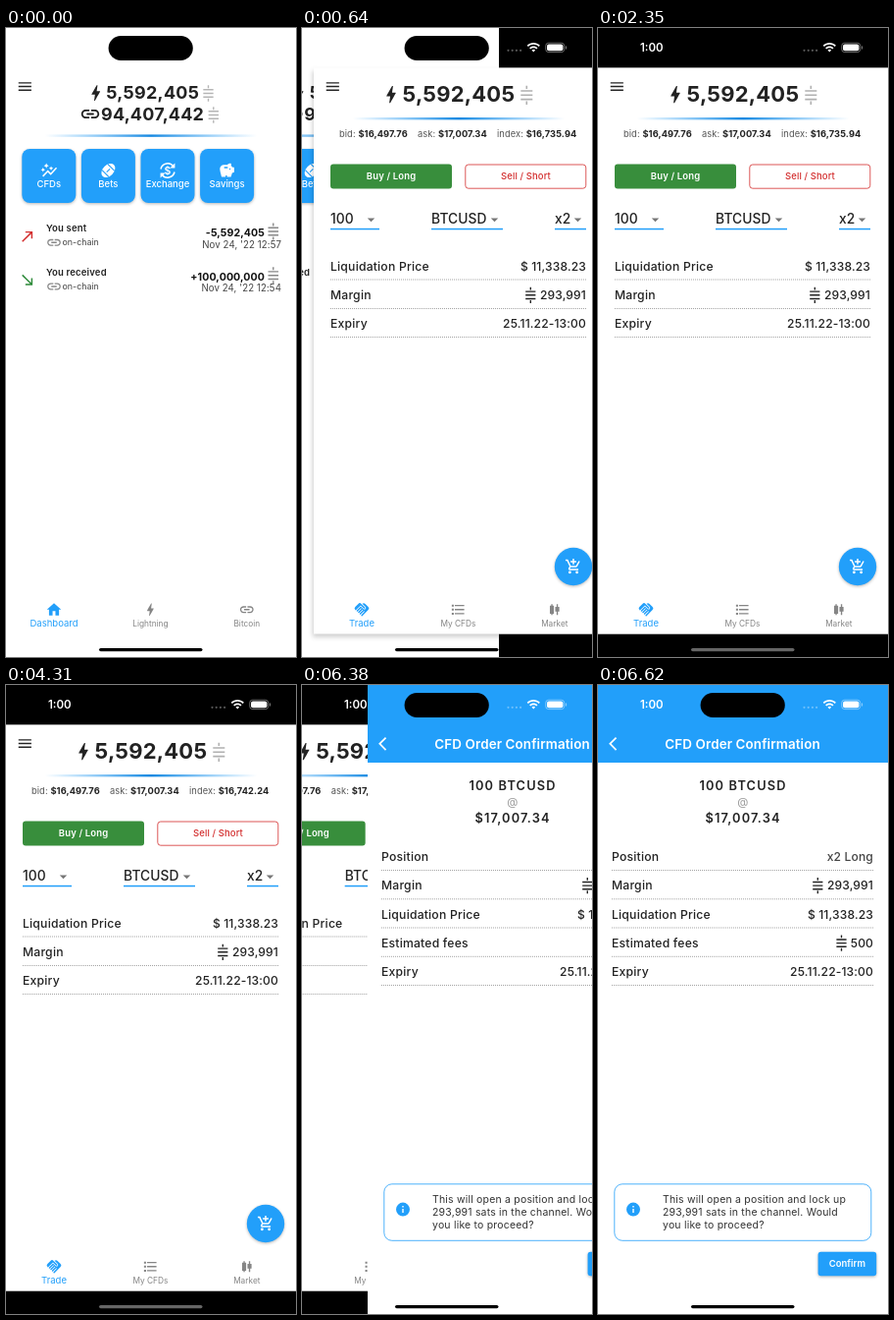
An HTML page for the animation above (8000 ms loop, 296 by 640 pixels).

```html
<!DOCTYPE html>
<html lang="en">
<head>
<meta charset="utf-8">
<title>Trading wallet</title>
<style>
  html, body { margin: 0; width: 100%; height: 100%; overflow: hidden; background: #fff; }
  svg { display: block; width: 100%; height: 100%; }
  text { font-family: Inter, Roboto, sans-serif; white-space: pre; }
  .lift { filter: drop-shadow(0 1.5px 1.5px rgba(0, 0, 0, .28)); }
  .sheet { filter: drop-shadow(-.5px 3px 2.5px rgba(0, 0, 0, .2)); }
</style>
</head>
<body>
<svg id="stage" viewBox="0 0 296 640" xmlns="http://www.w3.org/2000/svg"></svg>
<script>
const LOOP = 8000, WIDTH = 296, TOP = 40.6, BOTTOM = 616.5;
const BLUE = '#229ffa', INK = '#222', GREY = '#858585', RED = '#d32f2f', GREEN = '#388e3c';

// Icon outlines on a 24 unit grid
const ICONS = {
  menu: 'M3 18h18v-2H3zm0-5h18v-2H3zm0-7v2h18V6z',
  bolt: 'M11 21h-1l1-7H7.5c-.58 0-.57-.32-.38-.66C8.48 10.94 10.42 7.54 13 3h1l-1 7h3.5c.49 0 .56.33.47.51C12.96 17.55 11 21 11 21z',
  link: 'M3.9 12c0-1.71 1.39-3.1 3.1-3.1h4V7H7c-2.76 0-5 2.24-5 5s2.24 5 5 5h4v-1.9H7c-1.71 0-3.1-1.39-3.1-3.1zM8 13h8v-2H8zm9-6h-4v1.9h4c1.71 0 3.1 1.39 3.1 3.1s-1.39 3.1-3.1 3.1h-4V17h4c2.76 0 5-2.24 5-5s-2.24-5-5-5z',
  graph: 'M14.06 9.94L12 9l2.06-.94L15 6l.94 2.06L18 9l-2.06.94L15 12zM4 14l.94-2.06L7 11l-2.06-.94L4 8l-.94 2.06L1 11l2.06.94zm4.5-5l1.09-2.41L12 5.5 9.59 4.41 8.5 2 7.41 4.41 5 5.5l2.41 1.09zm-4 11.5l6-6.01 4 4L23 8.93l-1.41-1.41-7.09 7.97-4-4L3 19z',
  pig: 'M19.83 7.5l-2.27-2.27c.07-.42.18-.81.32-1.15.08-.18.12-.37.12-.58 0-.83-.67-1.5-1.5-1.5-1.64 0-3.09.79-4 2h-5C4.46 4 2 6.46 2 9.5S4.5 21 4.5 21H10v-2h2v2h5.5l1.68-5.59 2.82-.94V7.5zM13 9H8V7h5zm3 2a1 1 0 1 1 0-2 1 1 0 0 1 0 2z',
  up: 'M9 5v2h6.59L4 18.59 5.41 20 17 8.41V15h2V5z',
  down: 'M9 19v-2h6.59L4 5.41 5.41 4 17 15.59V9h2v10z',
  home: 'M10 20v-6h4v6h5v-8h3L12 3 2 12h3v8z',
  shake: 'M16.48 10.41c-.39.39-1.04.39-1.43 0l-4.47-4.46-7.05 7.04-.66-.63a3 3 0 0 1 0-4.24l4.24-4.24a3 3 0 0 1 4.24 0l5.13 5.13c.4.39.4 1.02 0 1.4zm.7-2.12c.78.78.78 2.05 0 2.83-1.27 1.27-2.61.22-2.83 0l-3.76-3.76-5.57 5.57a1 1 0 0 0 0 1.42c.39.39 1.02.39 1.42 0l4.62-4.62.71.71-4.62 4.62a1 1 0 0 0 0 1.42c.39.39 1.02.39 1.42 0l4.62-4.62.71.71-4.62 4.62a1 1 0 0 0 0 1.42c.39.39 1.02.39 1.42 0l4.62-4.62.71.71-4.62 4.62a1 1 0 0 0 1.41 1.41l8.32-8.34a3 3 0 0 0 0-4.24l-4.24-4.24a3 3 0 0 0-4.18-.06z',
  list: 'M7 5h14v2H7zm0 6h14v2H7zm0 6h14v2H7zM2.5 4.5h3v3h-3zm0 6h3v3h-3zm0 6h3v3h-3z',
  candles: 'M9 4H7v2H5v12h2v2h2v-2h2V6H9zm10 4h-2V4h-2v4h-2v7h2v5h2v-5h2z',
  drop: 'M7 10l5 5 5-5z',
  cart: 'M11 9h2V6h3V4h-3V1h-2v3H8v2h3zm-4 9a2 2 0 1 0 0 4 2 2 0 0 0 0-4zm10 0a2 2 0 1 0 0 4 2 2 0 0 0 0-4zm-9.83-3.25l.93-1.75h7.45c.75 0 1.41-.41 1.75-1.03l3.86-7.01L19.42 4l-3.87 7H8.53L4.27 2H1v2h2l3.6 7.59-1.35 2.45C4.5 15.4 5.5 17 7 17h12v-2H7.42c-.13 0-.25-.11-.25-.25z',
  wifi: 'M1 9l2 2c4.97-4.97 13.03-4.97 18 0l2-2C16.93 2.93 7.08 2.93 1 9zm8 8l3 3 3-3c-1.65-1.66-4.34-1.66-6 0zm-4-4l2 2c2.76-2.76 7.24-2.76 10 0l2-2C15.14 9.14 8.87 9.14 5 13z',
  back: 'M11.67 3.87L9.9 2.1 0 12l9.9 9.9 1.77-1.77L3.54 12z',
  info: 'M12 2a10 10 0 1 0 0 20 10 10 0 0 0 0-20zm1 15h-2v-6h2zm0-8h-2V7h2z'
};

// Icon centred on (x, y)
const icon = (name, x, y, size, fill) =>
  `<path d="${ICONS[name]}" fill="${fill}" transform="translate(${x - size / 2} ${y - size / 2}) scale(${size / 24})"/>`;

const text = (x, y, str, size, { fill = INK, weight = 400, anchor = 'start', gap = 0 } = {}) =>
  `<text x="${x}" y="${y}" font-size="${size}" fill="${fill}" font-weight="${weight}" text-anchor="${anchor}" letter-spacing="${gap}">${str}</text>`;

const rect = (x, y, w, h, fill, r = 0, extra = '') =>
  `<rect x="${x}" y="${y}" width="${w}" height="${h}" rx="${r}" fill="${fill}" ${extra}/>`;

const sats = (x, y, scale, color) =>
  `<path d="M0-9.6v3.4M-6-4.3h12M-6 0h12M-6 4.3h12M0 6.2v3.4" transform="translate(${x} ${y}) scale(${scale})" stroke="${color}" stroke-width="1.6" fill="none"/>`;

const glow = y => rect(40, y, 216, 2.4, 'url(#glow)');

const menu = () => icon('menu', 19.3, 59.5, 17.5, INK);

function nav(items) {
  return items.map(([name, label], i) => {
    const x = 49 + i * 98.4, on = i === 0;
    return icon(name, x, 591.8, on ? 17.5 : 16.5, on ? BLUE : GREY) +
      text(x, 608.6, label, on ? 9.5 : 8.3, { fill: on ? BLUE : GREY, anchor: 'middle' });
  }).join('');
}

function row(left, right, y, label, value, { sat = 0, fill = INK } = {}) {
  return text(left, y, label, 12.2, { gap: .2, weight: 450 }) +
    text(right, y, value, 12.1, { anchor: 'end', gap: .13, fill, weight: 450 }) +
    (sat ? sats(sat, y - 4.2, .85, INK) : '') +
    `<path d="M${left} ${y + 9.5}H${right}" stroke="#999" stroke-dasharray="1 1" stroke-width=".9"/>`;
}

function tile(i, label, art) {
  const x = 16.3 + i * 60.6;
  return rect(x, 123, 55, 55, BLUE, 8, 'class="lift"') + art(x + 27.5, 145) +
    text(x + 27.5, 162, label, 9.5, { fill: '#fff', weight: 500, anchor: 'middle' });
}

const ball = (x, y) => `<g transform="translate(${x} ${y}) rotate(-45)">
  <ellipse rx="8.2" ry="5.6" fill="#fff"/>
  <path d="M-4.2-4.8V4.8M4.2-4.8V4.8M-2.4 0h4.8" stroke="${BLUE}" stroke-width="1.1"/></g>`;

const swap = (x, y) => `<g transform="translate(${x} ${y})">
  <path d="M-7-1.5A7.2 7.2 0 0 1 6-4M7 1.5A7.2 7.2 0 0 1-6 4" fill="none" stroke="#fff" stroke-width="1.5"/>
  <path d="M7.4-7.4v5H2.4zM-7.4 7.4v-5h5z" fill="#fff"/></g>` +
  text(x, y + 3.8, '$', 10.5, { fill: '#fff', weight: 600, anchor: 'middle' });

const entry = (y, name, color, title, amount, date) =>
  icon(name, 22, y + 5, 17.5, color) +
  text(41, y, title, 9.5, { weight: 600, gap: .18 }) +
  icon('link', 49, y + 11.3, 16.5, '#888') +
  text(57.5, y + 14, 'on-chain', 8.9, { fill: '#444' }) +
  text(264, y + 5, amount, 10.6, { weight: 700, anchor: 'end', fill: '#111', gap: .08 }) +
  sats(272.8, y, .88, '#888') +
  text(281, y + 16.5, date, 9.7, { anchor: 'end', fill: '#444', gap: .07 });

const dashboard = () =>
  rect(0, 0, WIDTH, 640, '#fff') +
  menu() +
  icon('bolt', 91.7, 66, 21, INK) + text(102.3, 72, '5,592,405', 18, { weight: 700, gap: .28 }) +
  sats(206.5, 66.5, .86, '#b5b5b5') +
  icon('link', 86, 87.5, 22, INK) + text(97, 94, '94,407,442', 18, { weight: 700, gap: .2 }) +
  sats(211.8, 88.5, .86, '#b5b5b5') +
  glow(108.4) +
  tile(0, 'CFDs', (x, y) => icon('graph', x, y, 18, '#fff')) +
  tile(1, 'Bets', ball) +
  tile(2, 'Exchange', swap) +
  tile(3, 'Savings', (x, y) => icon('pig', x, y, 17.5, '#fff')) +
  entry(207, 'up', RED, 'You sent', '-5,592,405', "Nov 24, '22 12:57") +
  entry(251.7, 'down', '#2e8b3a', 'You received', '+100,000,000', "Nov 24, '22 12:54") +
  nav([['home', 'Dashboard'], ['bolt', 'Lightning'], ['link', 'Bitcoin']]);

const quote = (x, label, price) =>
  text(x, 111, `${label}: <tspan id="${label}" font-weight="700" fill="${INK}">${price}</tspan>`, 9.3, { fill: '#555', gap: .09 });

const picker = (x, right, value) =>
  text(x, 199.3, value, 13.8, { weight: 450, gap: .1 }) +
  icon('drop', right - 8.5, 195, 18, '#777') +
  rect(x, 203.8, right - x, 1.5, BLUE);

const trade = () =>
  rect(0, TOP, WIDTH, BOTTOM - TOP, '#fff', 0, 'class="sheet"') +
  menu() +
  icon('bolt', 79, 67.7, 23, INK) + text(90.5, 75.4, '5,592,405', 22, { weight: 700, gap: .2 }) +
  sats(217.3, 68.3, 1, '#b0b0b0') +
  glow(91) +
  quote(26, 'bid', '$16,497.76') + quote(106, 'ask', '$17,007.34') + quote(187, 'index', '') +
  rect(17, 138.6, 124, 25, GREEN, 3) +
  text(79, 154.4, 'Buy / Long', 9.5, { fill: '#fff', weight: 600, anchor: 'middle', gap: .15 }) +
  rect(154.8, 139, 123, 24.2, '#fff', 3, 'stroke="#dc5757" stroke-width="1"') +
  text(216.5, 154.4, 'Sell / Short', 9.5, { fill: RED, weight: 500, anchor: 'middle', gap: .1 }) +
  picker(17, 67, '100') + picker(120, 193, 'BTCUSD') + picker(246, 278, 'x2') +
  row(17, 278, 246.5, 'Liquidation Price', '$ 11,338.23') +
  row(17, 278, 276, 'Margin', '293,991', { sat: 221.3 }) +
  row(17, 278, 305, 'Expiry', '25.11.22-13:00') +
  `<circle cx="265" cy="548" r="19.2" fill="${BLUE}" class="lift"/>` +
  '<circle id="press" cx="265" cy="548" r="19.2" fill="#fff" opacity="0"/>' +
  icon('cart', 265, 548, 17.5, '#fff') +
  nav([['shake', 'Trade'], ['list', 'My CFDs'], ['candles', 'Market']]);

const confirmation = () =>
  rect(0, 0, WIDTH, 640, '#fff') +
  rect(0, 0, WIDTH, 79, BLUE) +
  icon('back', 19.4, 59.8, 16.6, '#fff') +
  text(147.6, 65, 'CFD Order Confirmation', 13.4, { fill: '#fff', weight: 600, anchor: 'middle', gap: .12 }) +
  text(148, 107, '100 BTCUSD', 12.8, { weight: 600, anchor: 'middle', gap: 1.15 }) +
  text(147.8, 122.6, '@', 11.5, { fill: '#999', anchor: 'middle' }) +
  text(148, 139.8, '$17,007.34', 12.8, { weight: 600, anchor: 'middle', gap: 1.1 }) +
  row(14, 281, 179, 'Position', 'x2 Long', { fill: '#444' }) +
  row(14, 281, 208.3, 'Margin', '293,991', { sat: 224.3 }) +
  row(14, 281, 237.5, 'Liquidation Price', '$ 11,338.23') +
  row(14, 281, 266.8, 'Estimated fees', '500', { sat: 248.5 }) +
  row(14, 281, 296, 'Expiry', '25.11.22-13:00') +
  rect(16.8, 507.8, 262, 57.5, '#fff', 8, `stroke="${BLUE}" stroke-opacity=".8" stroke-width="1"`) +
  icon('info', 36, 533.6, 16.8, BLUE) +
  ['This will open a position and lock up', '293,991 sats in the channel. Would', 'you like to proceed?']
    .map((line, i) => text(66, 527.2 + i * 13, line, 10.5, { fill: '#333', gap: .19 })).join('') +
  rect(224.6, 576.8, 59.6, 24.4, BLUE, 3, 'class="lift"') +
  text(254.4, 592.4, 'Confirm', 9.5, { fill: '#fff', weight: 600, anchor: 'middle' });

const status = () =>
  rect(104.6, 8, 86.2, 25, '#000', 12.5) +
  text(43, 24.2, '1:00', 11.5, { fill: '#fff', weight: 600 }) +
  [0, 1, 2, 3].map(i => `<circle cx="${210.5 + i * 4.2}" cy="22.8" r="1.1" fill="#fff" opacity=".35"/>`).join('') +
  icon('wifi', 236.3, 19.6, 14.4, '#fff') +
  rect(248.7, 15.2, 19, 9.4, 'none', 3, 'stroke="#fff" stroke-opacity=".45" stroke-width=".9"') +
  rect(250, 16.5, 16.4, 6.8, '#fff', 2) +
  rect(268.9, 18.3, 1.2, 3.2, '#fff', .6, 'opacity=".45"') +
  rect(95, 630.9, 105.5, 3.4, '#000', 1.7, 'id="handle"');

document.getElementById('stage').innerHTML = `
  <defs><linearGradient id="glow">
    <stop stop-color="${BLUE}" stop-opacity="0"/>
    <stop offset=".5" stop-color="#1487e0"/>
    <stop offset="1" stop-color="${BLUE}" stop-opacity="0"/>
  </linearGradient></defs>
  <g id="dash">${dashboard()}</g>
  <g id="bars">${rect(0, 0, WIDTH, TOP, '#000') + rect(0, BOTTOM, WIDTH, 640 - BOTTOM, '#000')}</g>
  <g id="trade">${trade()}</g>
  <g id="confirm">${confirmation()}</g>
  ${status()}`;

const el = id => document.getElementById(id);

// Latest value whose start time has passed
const step = (t, keys) => keys.filter(([at]) => t >= at).pop()[1];

const slide = (id, x) => {
  el(id).setAttribute('transform', `translate(${x} 0)`);
  el(id).setAttribute('visibility', x < WIDTH ? 'visible' : 'hidden');
};

// A covered page drifts left at a third of the speed
const drift = x => (x - WIDTH) / 3;

function draw(t) {
  const tradeX = step(t, [[0, WIDTH], [640, 12], [740, 0]]);
  const confirmX = step(t, [[0, WIDTH], [6380, 67], [6510, 8], [6620, 0]]);
  slide('dash', drift(tradeX));
  slide('bars', step(t, [[0, WIDTH], [640, 201], [740, 0]]));
  slide('trade', tradeX + drift(confirmX));
  slide('confirm', confirmX);
  el('index').textContent = t < 4310 ? '$16,735.94' : '$16,742.24';
  el('press').setAttribute('opacity', t >= 6220 && t < 6380 ? .14 : 0);
  el('handle').setAttribute('fill', t >= 740 && t < 6380 ? '#666' : '#000');
}

const start = performance.now();
function tick() {
  draw((performance.now() - start) % LOOP);
  requestAnimationFrame(tick);
}
tick();
</script>
</body>
</html>
```
